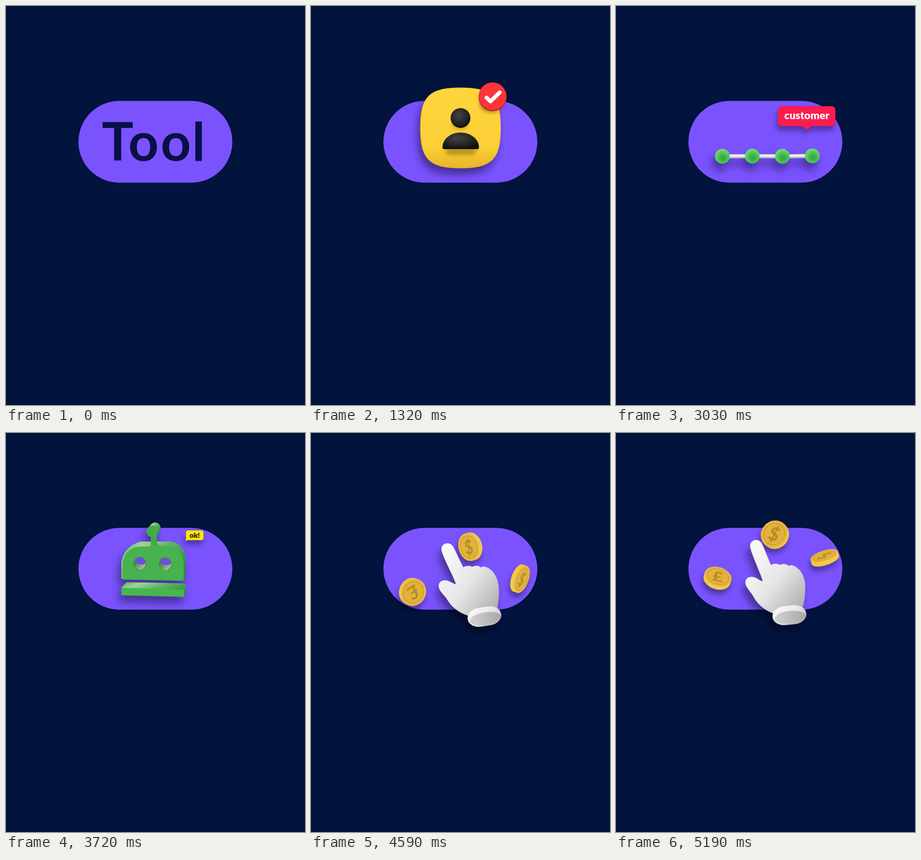
These frames come from a looping animation (648 by 864 pixels, 5.22 s). An HTML page:

```html
<!DOCTYPE html>
<html lang="ko">
<head>
<meta charset="utf-8">
<title>Pill</title>
<style>
html, body { margin: 0; width: 100%; height: 100%; overflow: hidden; background: #02133e; }
svg { display: block; width: 648px; height: 864px; }
text { text-anchor: middle; font-weight: 700; }
.round { font-family: Lato, Inter, sans-serif; font-weight: 900; }
.soft { filter: drop-shadow(-3px 10px 6px rgba(0, 0, 10, .36)); }
.deep { filter: drop-shadow(-6px 14px 9px rgba(0, 0, 10, .42)); }

.scene { visibility: hidden; animation: 5220ms step-end infinite; }
#tool { animation-name: tool; }
#profile { animation-name: profile; }
#orders { animation-name: orders; }
#chart { animation-name: chart; }
#robot { animation-name: robot; }
#tap { animation-name: tap; }
@keyframes tool { 0% { visibility: visible } 13.793% { visibility: hidden } }
@keyframes profile { 0% { visibility: hidden } 13.793% { visibility: visible } 34.482% { visibility: hidden } }
@keyframes orders { 0% { visibility: hidden } 34.482% { visibility: visible } 56.896% { visibility: hidden } }
@keyframes chart { 0% { visibility: hidden } 56.896% { visibility: visible } 71.264% { visibility: hidden } }
@keyframes robot { 0% { visibility: hidden } 71.264% { visibility: visible } 82.758% { visibility: hidden } }
@keyframes tap { 0% { visibility: hidden } 82.758% { visibility: visible } }

.move { animation: 5220ms ease-in-out infinite; }
#card { transform-origin: 324px 264px; animation-name: card; }
#badge { transform-origin: 393px 196px; animation-name: badge; }
#news { transform-origin: 444px 222px; animation-name: news; }
#label { transform-origin: 413px 269px; animation-name: label; }
#ok { transform-origin: 390px 232px; animation-name: ok; animation-timing-function: cubic-bezier(.2, .7, .3, 1); }
#head { transform-origin: 318px 320px; animation-name: head; }
#jaw { animation-name: jaw; }
#hand { transform-origin: 376px 397px; animation-name: hand; }
@keyframes card {
  0%, 13.793% { transform: scale(.7) }
  18.4% { transform: scale(1.04) }
  20.7%, 25.3% { transform: none }
  29.3% { transform: translateY(-16px) }
  33.3%, 100% { transform: none }
}
@keyframes badge {
  0%, 18.4% { transform: scale(0) }
  21.8% { transform: scale(1.08) }
  23.6%, 100% { transform: none }
}
@keyframes news {
  0%, 34.9% { transform: scale(0) }
  38% { transform: scale(1.07) }
  40%, 100% { transform: none }
}
@keyframes label {
  0%, 56.896% { transform: scale(.6) }
  57.9%, 58.3% { transform: none }
  68.4%, 100% { transform: translateY(-38px) }
}
@keyframes ok {
  0%, 71.3% { transform: none }
  78.5%, 100% { transform: scale(2.55) }
}
@keyframes head {
  0%, 71.3% { transform: none }
  74% { transform: translateY(-4px) rotate(1deg) }
  76.6% { transform: none }
  79.3% { transform: translateY(-4px) rotate(-1deg) }
  82%, 100% { transform: none }
}
@keyframes jaw {
  0%, 71.3%, 76.6%, 82%, 100% { transform: none }
  74%, 79.3% { transform: translateY(5px) }
}
@keyframes hand {
  0%, 82.758% { transform: rotate(4deg) }
  87.93% { transform: none }
  90.8% { transform: rotate(-1.2deg) }
  99.425%, 100% { transform: translateY(-3px) rotate(3.1deg) }
}
</style>
</head>
<body>
<svg viewBox="0 0 648 864">
  <defs>
    <clipPath id="pill"><rect x="157" y="205.5" width="333.5" height="177" rx="88.5"/></clipPath>
    <clipPath id="hole"><ellipse rx="12.5" ry="13.5"/></clipPath>
    <linearGradient id="yellow" x2="0" y2="1">
      <stop stop-color="#ffd63c"/><stop offset=".75" stop-color="#fbcf35"/><stop offset="1" stop-color="#e6b42a"/>
    </linearGradient>
    <radialGradient id="black" cx=".42" cy=".35" r=".65">
      <stop stop-color="#444"/><stop offset=".6" stop-color="#262626"/><stop offset="1" stop-color="#121212"/>
    </radialGradient>
    <radialGradient id="red" cx=".32" cy=".3" r=".8">
      <stop stop-color="#f4524c"/><stop offset=".45" stop-color="#dd2c2c"/><stop offset="1" stop-color="#7d0f12"/>
    </radialGradient>
    <radialGradient id="green" cx=".55" cy=".62" r=".68">
      <stop stop-color="#2fa03c"/><stop offset=".5" stop-color="#4cc453"/><stop offset=".85" stop-color="#6fda70"/><stop offset="1" stop-color="#a4eca0"/>
    </radialGradient>
    <linearGradient id="lit" x2="1" y2=".6">
      <stop stop-color="#45a54c"/><stop offset=".25" stop-color="#a3d39c"/><stop offset=".6" stop-color="#5fb263"/><stop offset="1" stop-color="#2d8f3d"/>
    </linearGradient>
    <linearGradient id="wall" x2="1" y2="1">
      <stop offset=".3" stop-color="#3c8c46"/><stop offset="1" stop-color="#c2d9b4"/>
    </linearGradient>
    <linearGradient id="glove" x1=".1" y1=".2" x2=".9" y2=".9">
      <stop stop-color="#f7f7f7"/><stop offset=".5" stop-color="#e6e6e6"/><stop offset="1" stop-color="#b4b4b4"/>
    </linearGradient>
    <linearGradient id="cuff" x2="1">
      <stop stop-color="#d2d2d2"/><stop offset="1" stop-color="#a8a8a8"/>
    </linearGradient>
    <filter id="blur" x="-50%" y="-100%" width="200%" height="300%"><feGaussianBlur stdDeviation="4"/></filter>
    <g id="eye">
      <ellipse rx="14" ry="15" fill="#369743"/>
      <g clip-path="url(#hole)">
        <ellipse rx="13" ry="14" fill="url(#wall)"/>
        <ellipse cx="3" cy="-9" rx="13" ry="11" fill="#6f4ae6"/>
      </g>
    </g>
  </defs>

  <rect width="648" height="864" fill="#02133e"/>
  <rect x="157" y="205.5" width="333.5" height="177" rx="88.5" fill="#7a53ff"/>

  <g id="tool" class="scene">
    <text x="242 298 368 417.5" y="335" font-family="Lato, Inter, sans-serif" font-size="114" fill="#091046">Tool</text>
  </g>

  <g id="profile" class="scene">
    <g id="card" class="move">
      <g class="deep">
        <path d="M237 264C237 196 256 177 324 177S411 196 411 264 392 351 324 351 237 332 237 264Z" fill="url(#yellow)" stroke="#e9b92e" stroke-width=".8"/>
      </g>
      <path d="M290 308H362L352 322H296Z" fill="#8a6a08" opacity=".6" filter="url(#blur)"/>
      <ellipse cx="323" cy="258" rx="17" ry="8" fill="#8a6a08" opacity=".5" filter="url(#blur)"/>
      <circle cx="324" cy="242.5" r="21.5" fill="url(#black)"/>
      <path d="M285 306C285 287 304 274 324 274S364 287 364 306Q364 310 360 310H289Q285 310 285 306Z" fill="url(#black)"/>
      <g id="badge" class="move">
        <ellipse cx="391" cy="211" rx="25" ry="19" fill="#5c3c08" opacity=".6" filter="url(#blur)"/>
        <circle cx="393.5" cy="197" r="30.5" fill="#b8181f"/>
        <circle cx="393.5" cy="195.5" r="30" fill="#fb3539"/>
        <path d="M380.5 198.5L389 206.5L409 187" fill="none" stroke="#fff" stroke-width="8.5" stroke-linecap="round" stroke-linejoin="round"/>
      </g>
    </g>
  </g>

  <g id="orders" class="scene">
    <g clip-path="url(#pill)"><rect id="rest" x="157" y="205" width="334" height="178" fill="#e8e8e8"/></g>
    <g class="soft" fill="#161616">
      <text x="327" y="256" font-family="'Noto Sans CJK KR', 'Noto Sans CJK', sans-serif" font-size="24">주문량</text>
      <text id="count" x="253 304 354 403" y="331" font-family="'Noto Sans Mono', monospace" font-size="78">0000</text>
    </g>
    <g id="news" class="move soft">
      <circle cx="444.5" cy="222" r="30.5" fill="url(#red)"/>
      <text x="444" y="235" font-family="'Open Sans', sans-serif" font-size="36" fill="#fff">N</text>
    </g>
  </g>

  <g id="chart" class="scene">
    <g id="chain" class="deep"></g>
    <g id="label" class="move soft">
      <path d="M360 217H467Q475.5 217 475.5 226V251Q475.5 260 467 260H422L413 269L404 260H360Q351 260 351 251V226Q351 217 360 217Z" fill="#fb1c50"/>
      <text class="round" x="413.5" y="245" font-size="23" fill="#fff">customer</text>
    </g>
  </g>

  <g id="robot" class="scene">
    <g class="deep">
      <g id="head" class="move">
        <path d="M250 316V283C252 262 262 248 281 239Q288 235 298 235H356C375 236 390 253 390 276L388 319Z" fill="url(#lit)"/>
        <path d="M314 244V220H327V238Q328 242 333 244Z" fill="#43a84b"/>
        <path d="M310 203L315 197A12 12 0 0 1 334 211L327 222Z" fill="url(#lit)"/>
        <circle cx="317" cy="213" r="12.5" fill="#3fae48"/>
        <path d="M252 314V286C253 264 268 246 291 246H308Q314 246 316 240H322Q323 244 330 244H347C370 244 385 262 385 284V317Q385 320 381 320L256 317.5Q252 317 252 314Z" fill="#48b150"/>
        <use href="#eye" x="290" y="283"/>
        <use href="#eye" x="345" y="284"/>
      </g>
      <g id="jaw" class="move">
        <path d="M250 335L261 323L386 325.5L390 329V343L386 354Z" fill="url(#lit)"/>
        <path d="M250 335L386 339V355L253 351.5Q250 351.5 250 348Z" fill="#46b64e"/>
      </g>
    </g>
    <g id="ok" class="move soft">
      <path d="M395 211H423Q428 211 428 216V227Q428 232 423 232H393L389 233.5L390 229V216Q390 211 395 211Z" fill="#ffe500"/>
      <text class="round" x="409" y="227" font-size="15.5" fill="#161616">ok!</text>
    </g>
  </g>

  <g id="tap" class="scene">
    <g id="coins" class="soft"></g>
    <g id="hand" class="move deep">
      <path d="M283 255C280 238 300 233 308 246C315 259 323 277 330 291C336 287 344 287 349 290C356 286 364 287 368 291C372 289 376 289 379 290C396 296 406 315 407 335C408 355 406 370 403 382L345 397C319 390 304 375 296 362C290 352 279 344 277 334C275 323 284 318 292 319C302 320 308 327 314 327C308 308 288 274 283 255Z" fill="url(#glove)"/>
      <g transform="rotate(-9 376 397)">
        <rect x="339" y="377" width="73.5" height="41" rx="27" ry="20" fill="url(#glove)"/>
        <ellipse cx="377" cy="402.5" rx="34" ry="14" fill="url(#cuff)"/>
      </g>
    </g>
  </g>
</svg>
<script>
const LOOP = 5220;
const $ = id => document.getElementById(id);
const mix = (a, b, p) => a + (b - a) * p;
const span = (t, from, to) => Math.min(1, Math.max(0, (t - from) / (to - from)));
const ease = p => p * p * (3 - 2 * p);

function add(parent, tag, attrs, text = '') {
  const el = document.createElementNS('http://www.w3.org/2000/svg', tag);
  set(el, attrs);
  el.textContent = text;
  return parent.appendChild(el);
}
function set(el, attrs) {
  for (const k in attrs) el.setAttribute(k, attrs[k]);
}

// Line chart: x, resting y, raised y
const points = [[230.5, 325.5, 328], [295.5, 325, 299], [360.5, 325.5, 316], [425.5, 324.5, 277]];
const rods = points.slice(1).map(() => [
  add($('chain'), 'line', { stroke: '#b9bfc4', 'stroke-width': 9 }),
  add($('chain'), 'line', { stroke: '#eef0f0', 'stroke-width': 4.5 })
]);
const balls = points.map(([cx]) => add($('chain'), 'circle', { cx, r: 16, fill: 'url(#green)' }));

function drawChart(t) {
  const p = ease(span(t, 3030, 3570));
  const ys = points.map(([, a, b]) => mix(a, b, p));
  balls.forEach((ball, i) => set(ball, { cy: ys[i] }));
  rods.forEach((pair, i) => pair.forEach((rod, k) => set(rod, {
    x1: points[i][0], y1: ys[i] - k, x2: points[i + 1][0], y2: ys[i + 1] - k
  })));
}

// Coins: each value goes from one pose to the next; y follows a toss
const coins = [
  { sign: '£', x: [222, 221], y: [345, 311], r: 30, flat: [.9, .68], turn: [115, 18], spin: [150, 10] },
  { sign: '$', x: [342, 343], y: [247, 219], r: 30.5, flat: [.73, .92], turn: [-105, -50], spin: [-8, 22] },
  { sign: '$', x: [457, 451], y: [317, 266], r: 31, flat: [.46, .36], turn: [110, -18], spin: [24, 40] }
].map(coin => {
  const g = add($('coins'), 'g', {});
  const body = add(g, 'path', { fill: '#f3c84c' });
  const face = add(g, 'g', {});
  const r = coin.r;
  add(face, 'circle', { r, fill: '#e6b944' });
  add(face, 'circle', { r: r * .8, fill: '#e2b23c', stroke: '#c3932a', 'stroke-width': 1.5 });
  const sign = add(face, 'text', { y: 15, 'font-size': 42, 'font-family': 'Lato, sans-serif', fill: '#b58a25' }, coin.sign);
  return { ...coin, g, body, face, sign };
});

const PEAK = 4960;
function drawCoins(t) {
  const u = (t - 4590) / 600;
  const grow = ease(span(t, 4350, 4560));
  for (const c of coins) {
    const [flat, turn, spin] = [c.flat, c.turn, c.spin].map(v => mix(...v, u));
    const k = (c.y[0] - c.y[1]) / ((4590 - PEAK) ** 2 - (5190 - PEAK) ** 2);
    const y = c.y[1] + k * ((t - PEAK) ** 2 - (5190 - PEAK) ** 2);
    const x = mix(335, mix(...c.x, u), grow);
    const depth = 10 * Math.sqrt(Math.max(0, 1 - flat * flat));
    const r = c.r, ry = r * flat;
    set(c.g, { transform: `translate(${x} ${y}) rotate(${turn}) scale(${grow})` });
    set(c.body, { d: `M${-r} 0A${r} ${ry} 0 0 1 ${r} 0V${depth}A${r} ${ry} 0 0 1 ${-r} ${depth}Z` });
    set(c.face, { transform: `scale(1 ${flat})` });
    set(c.sign, { transform: `rotate(${spin - turn})` });
  }
}

function drawOrders(t) {
  const p = t < 2220 ? .4 * span(t, 1800, 2220) : mix(.4, .98, span(t, 2220, 2970));
  const edge = 333.5 * p;
  set($('rest'), { x: 157 + edge, width: 334 - edge });
  $('count').textContent = String(Math.round(357 * p)).padStart(4, '0');
}

let start;
function tick(now) {
  start ??= now;
  const t = (now - start) % LOOP;
  drawOrders(t);
  drawChart(t);
  drawCoins(t);
  requestAnimationFrame(tick);
}
requestAnimationFrame(tick);
</script>
</body>
</html>
```
